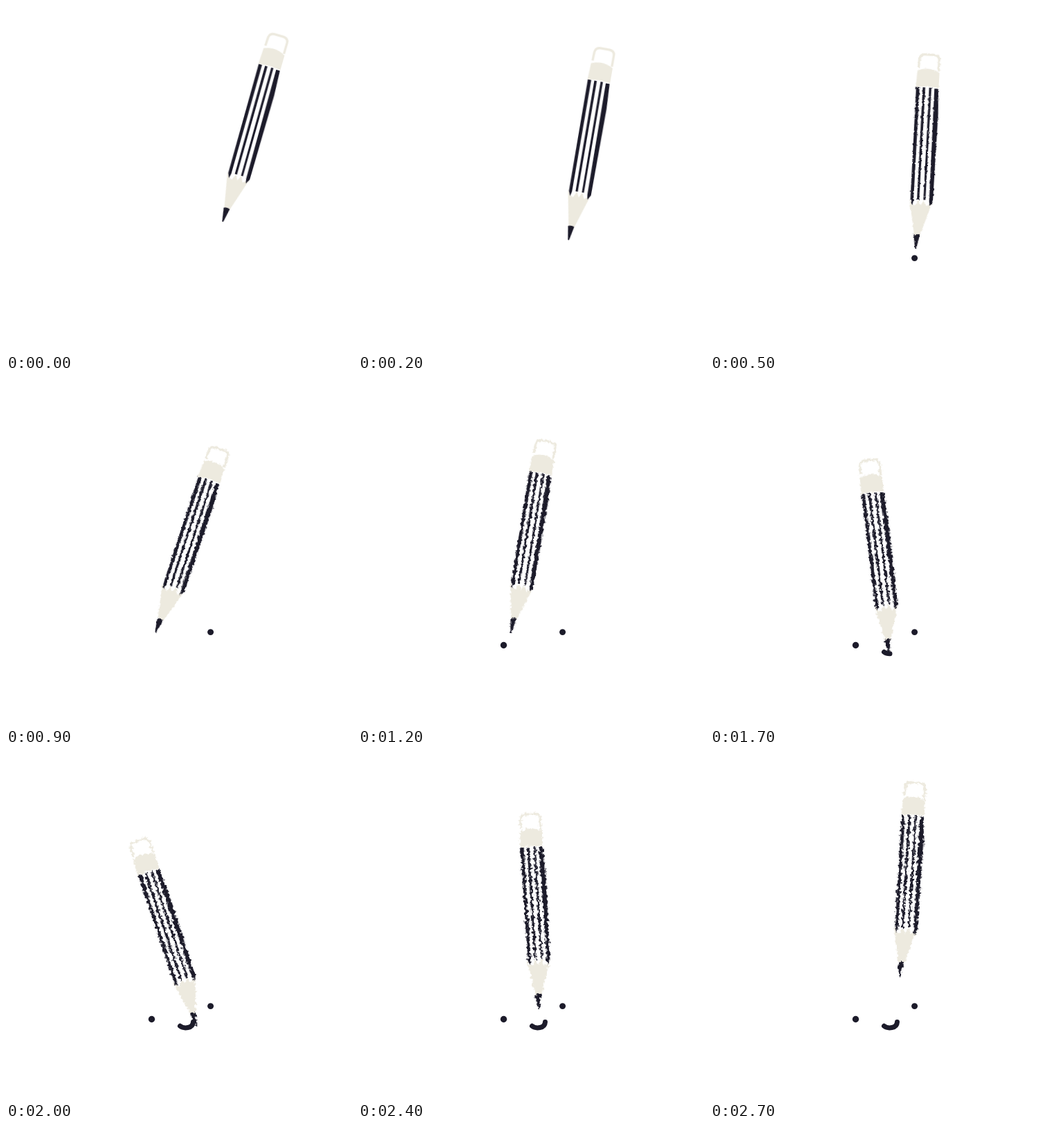
Write an HTML page without scripts that moves like this. It is 500 px wide and 499 px high and loops after 2800 ms.

```html
<!DOCTYPE html>
<html lang="en">
<head>
<meta charset="utf-8">
<title>Pencil drawing a face</title>
<style>
  html, body { margin: 0; width: 100%; height: 100%; overflow: hidden; background: #fff; }
  svg { display: block; width: 100%; height: 100%; }
  .ink { fill: #1c1b2a; }
  .cream { fill: #edeadf; }
  .eraser { fill: none; stroke: #edeadf; stroke-width: 3.4; }
  .smile { fill: none; stroke: #1c1b2a; stroke-width: 7; stroke-linecap: round; stroke-dasharray: 100 200; }

  /* The small negative delay keeps each step clear of its time boundary. */
  .pencil, .dot, .smile { animation: 2.8s -5ms step-end infinite; }
  .pencil { animation-name: draw; }
  .right { animation-name: show-right; }
  .left { animation-name: show-left; }
  .smile { animation-name: smile; }

  /* The origin of the pencil is its tip; steps last 100 ms. */
  @keyframes draw {
    0% { transform: translate(313px, 311px) rotate(16deg); animation-timing-function: steps(4); }
    14.286% { transform: translate(295px, 364px) rotate(4deg); }
    17.857% { transform: translate(297px, 350px) rotate(3.3deg); }
    21.429% { transform: translate(280px, 328px) rotate(9.5deg); }
    25% { transform: translate(255px, 330px) rotate(14.5deg); animation-timing-function: steps(2); }
    32.143% { transform: translate(216px, 364px) rotate(18.5deg); }
    35.714% { transform: translate(210px, 382px) rotate(15deg); animation-timing-function: steps(2); }
    42.857% { transform: translate(221px, 364px) rotate(9.6deg); animation-timing-function: steps(2); }
    50% { transform: translate(242px, 381px) rotate(0deg); }
    53.571% { transform: translate(251px, 392px) rotate(-2deg); animation-timing-function: steps(3); }
    64.286% { transform: translate(262px, 396px) rotate(-9deg); animation-timing-function: steps(2); }
    71.429% { transform: translate(275.5px, 392.5px) rotate(-18.2deg); }
    75% { transform: translate(276px, 388px) rotate(-20deg); animation-timing-function: steps(3); }
    85.714% { transform: translate(261px, 367px) rotate(-3.4deg); animation-timing-function: steps(3); }
    96.429%, 100% { transform: translate(274px, 321px) rotate(3.8deg); }
  }
  @keyframes show-right {
    0% { opacity: 0; }
    14.286%, 100% { opacity: 1; }
  }
  @keyframes show-left {
    0% { opacity: 0; }
    35.714%, 100% { opacity: 1; }
  }
  @keyframes smile {
    0% { opacity: 0; stroke-dashoffset: 97; }
    53.571% { opacity: 1; stroke-dashoffset: 97; animation-timing-function: steps(3); }
    64.286% { opacity: 1; stroke-dashoffset: 45; animation-timing-function: steps(2); }
    71.429%, 100% { opacity: 1; stroke-dashoffset: 0; }
  }
</style>
</head>
<body>
<svg viewBox="0 0 500 499" preserveAspectRatio="none">
  <filter id="rough" filterUnits="userSpaceOnUse" x="0" y="0" width="500" height="499" color-interpolation-filters="sRGB">
    <feTurbulence type="fractalNoise" baseFrequency=".24" numOctaves="2" seed="7" result="noise"/>
    <feDisplacementMap in="SourceGraphic" in2="noise" scale="0" xChannelSelector="R" yChannelSelector="G">
      <animate attributeName="scale" values="0;3;4.5;5.5;6.5;7;7.5" dur="2.8s" calcMode="discrete" repeatCount="indefinite"/>
    </feDisplacementMap>
  </filter>

  <ellipse class="ink dot right" cx="295.6" cy="363.6" rx="4.5" ry="4.3"/>
  <circle class="ink dot left" cx="210.5" cy="382.5" r="4.7"/>
  <path class="smile" pathLength="100" d="M251.5 392.3C257 396.5 270 396 270.5 386.5"/>

  <g filter="url(#rough)">
    <g class="pencil">
      <path class="eraser" d="M-10.5-261L-10-274Q-9-280-3-280.5L11-280.5Q18-280 18.5-274L18.5-257"/>
      <path class="cream" d="M-12-257Q4-264 20-255L20-233Q4-236-13-233Z"/>
      <path class="cream" d="M-13-71L-8-64L-4-62L0-71L4-63L8-71L12-62L17-66L21-70L5-19L-3-19Z"/>
      <g class="ink">
        <path d="M-12.5-233H-7.5L-7-70L-8.5-63L-11.5-70Z"/>
        <path d="M-3-233H.7L1.3-71H-2Z"/>
        <path d="M6.3-233H9.6L10.3-71H7.3Z"/>
        <path d="M14-232H19.6L21.5-196L21-69L17-62L15.7-69Z"/>
        <path d="M-4-20Q1-22 5-20L1 0L-.7 0Z"/>
      </g>
    </g>
  </g>
</svg>
</body>
</html>
```
